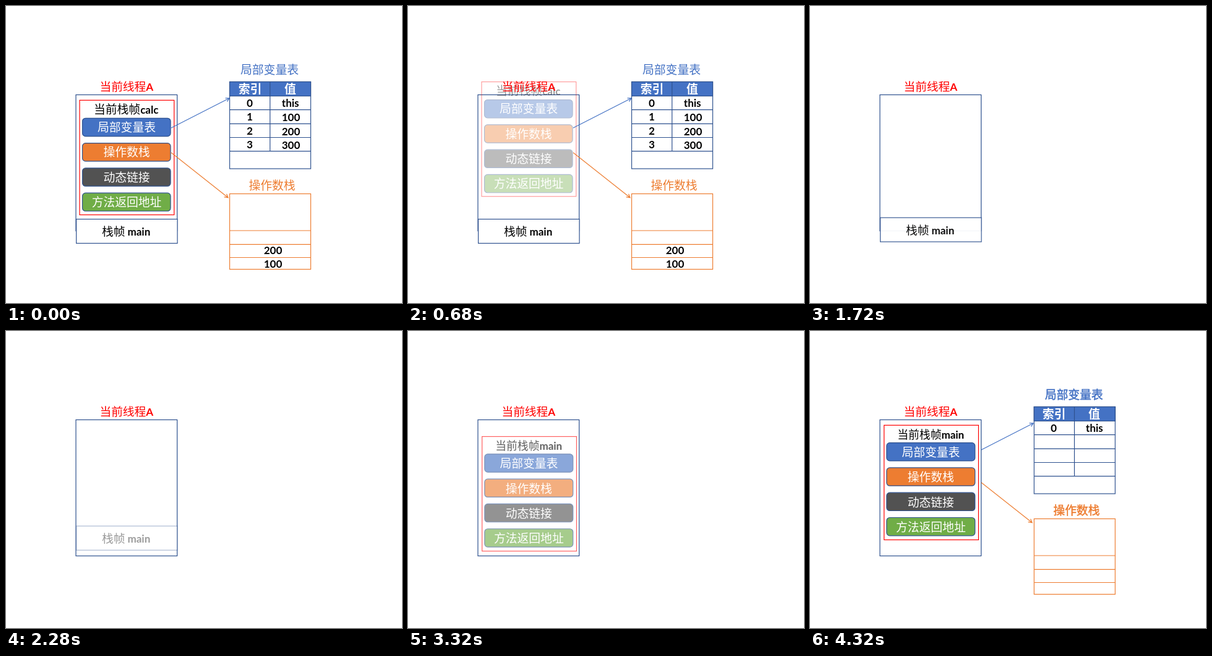
An HTML page that plays this animation: 640x480 px, repeating every 4900 ms.

```html
<!DOCTYPE html>
<html lang="zh-CN">
<head>
<meta charset="utf-8">
<title>栈帧出栈</title>
<style>
html, body { margin: 0; width: 100%; height: 100%; overflow: hidden; background: #fff; }
svg { display: block; width: 640px; height: 480px; }
text { font-family: "Noto Sans CJK SC", "Noto Sans CJK", sans-serif; font-size: 18.8px; white-space: pre; }
.latin { font-family: Lato, "Open Sans", sans-serif; font-weight: 700; font-size: 17px; }
</style>
</head>
<body>
<svg id="stage" viewBox="0 0 640 480">
  <defs id="defs"></defs>
</svg>
<script>
const LOOP = 4900, STEP = 40, RISE = 48;
const BLUE = '#4472c4', ORANGE = '#ed7d31', NAVY = '#2f528f', RED = '#ff0000';
const stage = document.getElementById('stage');
const defs = document.getElementById('defs');

function add(parent, tag, attrs = {}, content = '') {
  const el = document.createElementNS('http://www.w3.org/2000/svg', tag);
  for (const key in attrs) el.setAttribute(key, attrs[key]);
  el.textContent = content;
  parent.append(el);
  return el;
}
const group = (parent = stage) => add(parent, 'g');
const box = (g, x, y, right, bottom, stroke, fill = 'none', rx = 0) =>
  add(g, 'rect', { x, y, width: right - x, height: bottom - y, stroke, fill, rx, 'stroke-width': 1.2 });
const path = (g, d, stroke) => add(g, 'path', { d, stroke, fill: 'none', 'stroke-width': 1.2 });
const centered = (g, x, y, fill, str, extra = {}) =>
  add(g, 'text', { x, y, fill, 'text-anchor': 'middle', ...extra }, str);
const value = (g, x, cy, str) => centered(g, x, cy + 6, '#000', str, { class: 'latin' });

function mixed(g, x, y, fill, han, latin, size = 18.7) {
  const t = add(g, 'text', { x, y, fill, style: `font-size:${size}px` }, han);
  add(t, 'tspan', { class: 'latin' }, latin);
}

function arrow(g, x1, y1, x2, y2, color) {
  const a = Math.atan2(y2 - y1, x2 - x1);
  const barb = s => `${x2 - 6.5 * Math.cos(a + s)} ${y2 - 6.5 * Math.sin(a + s)}`;
  path(g, `M${x1} ${y1}L${x2} ${y2}M${barb(0.5)}L${x2} ${y2}L${barb(-0.5)}`, color);
}

function currentFrame(name, dx, size) {
  const g = group();
  box(g, 119 + dx, 152.3, 271.7 + dx, 337.5, RED);
  mixed(g, 142 - dx, 173.5, '#000', '当前栈帧', name, size);
  [['局部变量表', BLUE], ['操作数栈', ORANGE], ['动态链接', '#525252'], ['方法返回地址', '#70ad47']]
    .forEach(([label, fill], i) => {
      const y = 181.3 + i * 40.3 - dx;
      box(g, 123.5 + dx / 2, y, 266 + dx, y + 29.3, NAVY, fill, 5);
      centered(g, 195 + dx / 2, 203 + i * 40.3, '#fff', label);
    });
  return g;
}

function localsTable(rows, dx, arrowX, heading) {
  const g = group(), L = 361.5 + dx, R = 492.5 + dx, M = 426.7 + dx;
  arrow(g, arrowX, 197 - (arrowX - 267) * 0.5, 361, 149, BLUE);
  centered(g, 426 + dx, 109.5, BLUE, '局部变量表', heading);
  box(g, L, 122.5, R, 263, NAVY);
  box(g, L, 122.5, R, 145.5, NAVY, BLUE);
  path(g, [145.5, 167.7, 190.4, 212.5, 234.6].map(y => `M${L} ${y}H${R}`).join('') + `M${M} 122.5V234.6`, NAVY);
  centered(g, 394.5, 141, '#fff', '索引', { 'font-weight': 700 });
  centered(g, 459.5, 141, '#fff', '值', { 'font-weight': 700 });
  rows.forEach((v, i) => {
    value(g, 394, 157 + i * 22.3, i);
    value(g, i ? 460.5 : 459.7, 157.3 + i * 22.7, v);
  });
  return g;
}

function operandStack(items, dx, arrowX, heading) {
  const g = group(), L = 361.5 + dx, R = 492.5 + dx;
  arrow(g, arrowX, 237 + (arrowX - 267) * 0.8, 359, 309.7, ORANGE);
  centered(g, 430 + dx, 296.5, ORANGE, '操作数栈', heading);
  box(g, L, 303.5, R, 425.5, ORANGE);
  path(g, [363, 385.3, 406.5].map(y => `M${L} ${y}H${R}`).join(''), ORANGE);
  items.forEach((v, i) => value(g, 431.5, 417 - i * 22, v));
  return g;
}

// Soft-edged reveal from top to bottom
function wipe(g, id, top, bottom) {
  const soft = 0.3, h = bottom - top;
  const grad = add(defs, 'linearGradient', { id: id + 'Fade', gradientUnits: 'userSpaceOnUse', x1: 0, x2: 0 });
  add(grad, 'stop', { offset: 0, 'stop-color': '#fff' });
  add(grad, 'stop', { offset: 1, 'stop-color': '#000' });
  const mask = add(defs, 'mask', { id, maskUnits: 'userSpaceOnUse', x: 0, y: 0, width: 640, height: 480 });
  add(mask, 'rect', { width: 640, height: 480, fill: `url(#${id}Fade)` });
  g.setAttribute('mask', `url(#${id})`);
  return p => {
    const lead = top + h * p * (1 + soft);
    grad.setAttribute('y1', lead - h * soft);
    grad.setAttribute('y2', lead);
    g.setAttribute('visibility', p > 0 ? 'visible' : 'hidden');
  };
}

box(stage, 113, 143.5, 276.6, 363.5, NAVY);
const caller = group();
box(caller, 113.6, 344.5, 277, 383.5, NAVY, '#fff');
mixed(caller, 155, 371, '#000', '栈帧', ' main');
const calc = currentFrame('calc', 0, 18.8);
const main = currentFrame('main', 0.7, 17.8);
mixed(stage, 151.5, 137, RED, '当前线程', 'A');

const calcData = [
  localsTable(['this', 100, 200, 300], 0, 267),
  operandStack([100, 200], 0, 267)
];
const heavy = c => ({ stroke: c, 'stroke-width': 0.5 });
const reveals = [
  wipe(localsTable(['this'], 0.7, 277, heavy(BLUE)), 'locals', 92, 265),
  wipe(operandStack([], 0.7, 277, heavy(ORANGE)), 'operands', 245, 427)
];

const progress = (t, start, length) => Math.min(1, Math.max(0, (t - start) / length));
function place(g, dy, opacity) {
  g.setAttribute('transform', `translate(0 ${dy})`);
  g.setAttribute('opacity', opacity);
}

function draw(now) {
  let t = Math.floor((now % LOOP) / STEP) * STEP;
  if (t < 120) t = 0;
  const calcOut = progress(t, 60, 1000);
  const dataOut = progress(t, 1130, 500);
  const callerOut = progress(t, 1670, 1000);
  const mainIn = progress(t, 2700, 1000);
  const dataIn = progress(t, 3690, 500);
  place(calc, -RISE * calcOut, 1 - calcOut);
  calcData.forEach(g => g.setAttribute('opacity', 1 - dataOut));
  place(caller, -RISE * callerOut, 1 - callerOut);
  place(main, RISE * (1 - mainIn), mainIn);
  reveals.forEach(show => show(dataIn));
}

function tick() {
  draw(performance.now());
  requestAnimationFrame(tick);
}
tick();
</script>
</body>
</html>
```
